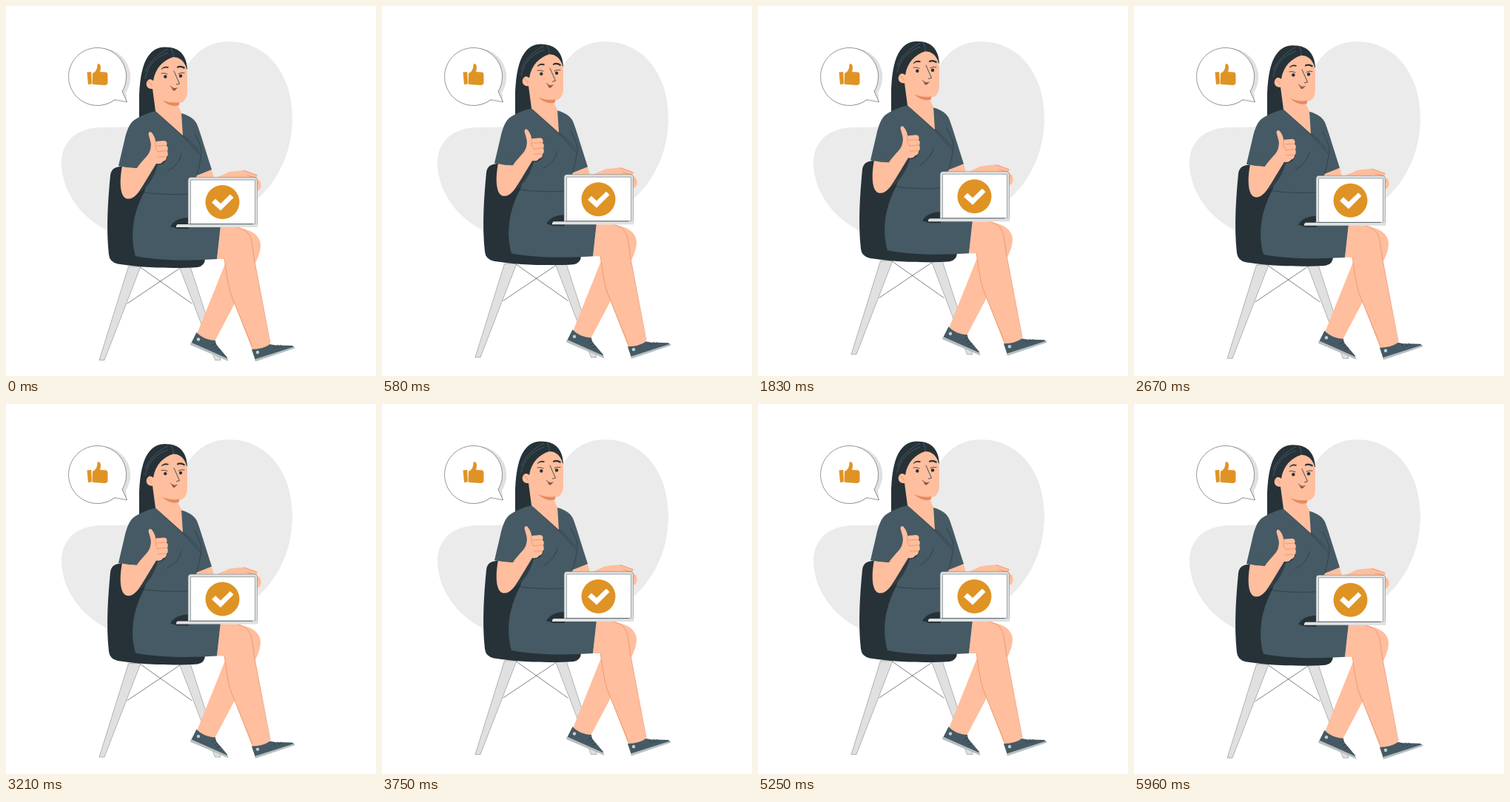
Animation, 500 px wide and 500 px high, one loop 6000 ms. Source, as an HTML page:

```html
<!DOCTYPE html>
<html lang="en">
<head>
<meta charset="utf-8">
<title>Thumbs up</title>
<style>
  html, body { margin: 0; width: 100%; height: 100%; overflow: hidden; background: #fff; }
  svg { display: block; width: 100%; height: 100%; }
  .skin { fill: #ffbe9d; }
  .dark { fill: #263238; }
  .cloth { fill: #455a64; }
  .gold { fill: #df9324; }
  .metal { fill: #e0e0e0; stroke: #4b585f; stroke-width: .4; }
  .line { fill: none; stroke: #263238; stroke-width: .6; stroke-linecap: round; stroke-linejoin: round; }
  .face { stroke-width: .8; }
  .crease { fill: none; stroke: #e58b61; stroke-width: .7; stroke-linecap: round; }
</style>
</head>
<body>
<svg viewBox="0 0 500 500">
  <path fill="#ebebeb" d="M301 48C352 48 387 91 387 151C387 199 366 239 337 263C290 301 220 330 170 314C112 304 75 256 75 212C75 181 98 164 130 164C160 164 182 164 200 155C230 139 232 48 301 48Z"/>

  <!-- speech bubble -->
  <path fill="#e0e0e0" d="M129 57A39 39 0 0 1 162 117L164 130 149 126A39 39 0 1 1 129 57Z"/>
  <path fill="#fff" stroke="#263238" stroke-width=".5" d="M147 126.600A39 39 0 1 1 157 115.500L163.500 129.700Z"/>
  <g class="gold">
    <path d="M109.500 89.500L115.300 89 115.800 105.500 111 106Z"/>
    <path d="M117 91C121 89 123.500 86 123.500 79Q124 77.500 126 78.500C129 80.500 128 85 127 89L135.500 89.500Q137.500 90 137.500 94V104Q137 107 133 107L119 106Q116.500 106 116.500 104Z"/>
  </g>

  <g id="figure">
    <!-- chair -->
    <path class="line" d="M180 352L251 402M237 353L164 402"/>
    <path class="metal" d="M165.500 352H182L133 478.500H126ZM234 352H249L290 478.500H282.500Z"/>
    <path class="dark" d="M165 214L154 217Q142 218 141 229C138 260 135 300 139 336Q140 346 151 348.500C185 354 230 355 259 353Q269 351 269 341L200 250 190 220Z"/>

    <!-- legs -->
    <path class="skin" d="M303 300C325 298 344 308 344 323C344 332 340 342 335 351L308 404 281 455Q267 453 258 443L297 346Z"/>
    <path class="skin" d="M285 342L290 299H312C327 300 333 312 333 325L336 345 357 458Q346 465 333 465L304 390C299 375 298 358 295 342Z"/>
    <path class="crease" d="M313 299.500C328 302 332 313 333 325L336 345 357 455M295 342C298 358 299 375 304 390L333 461"/>

    <!-- shoes -->
    <path class="cloth" d="M257.500 441C264 448 274 452 283 452Q283 457 288 462L299 475V479L249.500 457Z"/>
    <path fill="#b7bec2" d="M250 454.500L299.500 476.500 300.500 480 249 458Z"/>
    <path class="cloth" d="M332 464Q347 464 357 457Q362 459 371 458.500L387 459 390 461.500 337 479Z"/>
    <path fill="#b7bec2" d="M336 477.500L389 460.500 390.500 462.500 337 480.500Z"/>
    <path class="line" d="M278 459L283 456M282 462L286 460M285 466L289 464M364 463L361 458M369 462L367 458M373 461L371 458"/>
    <g fill="#c7ced1"><circle cx="260" cy="450.500" r="2.200"/><circle cx="340" cy="468" r="2.200"/></g>

    <!-- hair behind the neck -->
    <path class="dark" d="M180 153V120C181 95 185 78 192 68C200 57 208 54 222 56C235 58 244 67 245 85L215 110 203 144Z"/>

    <!-- far arm -->
    <path class="skin" d="M257 230L277 219 281 231 258 235ZM284 232L302 224Q312 223 322 222L339 228Q341 230 338 232L343 236Q346 243 344 246L341 250 337 246V235Z"/>
    <path class="crease" d="M322 222.500L339 228.500M326 229L338 232M337 235L341 240"/>

    <!-- dress -->
    <path class="cloth" d="M202 142C190 145 178 150 171 156C165 162 162 173 160 182L152 216 186 220 198 212 187 251C174 275 166 306 175 338C210 345 255 344 285 342L290 297 247 253 258 229 278 221C270 196 264 176 259 162Q255 150 237 145Z"/>
    <path fill="#2f3d45" d="M199 213L218 203Q217 214 205 215C200 232 193 241 186 248L178 253Z"/>
    <path class="dark" d="M247 286Q229 286 222 298L232 301H247Z"/>
    <path class="line" d="M202 142L239 176 262 201M238 174Q247 180 261 196M255 173C263 188 264 192 264 199Q262 215 258 228M237 200Q234 215 218 223M187 252Q215 256 247 254"/>

    <!-- head -->
    <path class="skin" d="M226 69C238 69 245 80 245 92V115Q245 131 231 132L237 144 239 175 202 142 198 112C189 113 187 102 194 99Q197 99 199 101C202 83 213 73 226 69Z"/>
    <path fill="#e58b61" d="M211 127Q222 132 234 130V134Q223 138 211 127Z"/>
    <path fill="none" stroke="#607d8b" stroke-width=".5" d="M188 98C192 79 203 69 219 63M188 89C195 73 207 64 219 58M223 57Q227 64 226 69"/>
    <path class="dark" d="M210 85Q214 80 220 82.500L219 84Q214 82.500 210 86ZM231 82Q236 79 242 83L241 85Q236 81.500 231 84Z"/>
    <g class="dark"><circle cx="215.300" cy="95.500" r="2.200"/><circle cx="236" cy="94.500" r="2.200"/></g>
    <path class="line face" d="M210 91Q214 90 218 92M233 91.500Q237 89.500 241 90.500M227 88L234.500 105 230.500 106M222.500 108.500Q226 113 231 111"/>
    <path fill="#a2503c" d="M223.500 110Q227 113 230.500 111.500Q228.500 115.500 225.500 114Z"/>
    <path class="crease" d="M192 103Q196 103 197 108"/>

    <!-- raised hand -->
    <path class="skin" d="M157 216C153 237 154 256 162 260C172 263 178 254 186 241L203 213Q210 214 212 210Q217 209 217 204Q220 201 218 196Q220 191 217 189Q219 183 214 182L202 183C202 179 199 173 196 170.500Q193 169 192.500 173C194 180 197 186 195.500 191Q195 197 191 202L176 219Z"/>
    <path class="crease" d="M202 183L202 191M204 189L216 188.500M205 197L217 195.500M205 204L216 203.500M202 191Q203 195 206 197"/>
    <path class="cloth" d="M152 216L160 208H184L177 219Q164 219 152 216Z"/>

    <!-- laptop -->
    <path class="metal" d="M246 298V236Q246 231.500 250 231.500H335Q339.500 231.500 339.500 236V298Z"/>
    <path fill="#fff" stroke="#455a64" stroke-width=".5" d="M249.500 235H336.500V294.500H249.500Z"/>
    <path fill="#e0e0e0" d="M232 295H340V299H230Q229.500 296 232 295Z"/>
    <path class="line" d="M247 294.700H333"/>
    <circle class="gold" cx="292.500" cy="265" r="23"/>
    <path fill="#fff" d="M278 265.500L283 260.500 290 267 303 254.500 307.500 259 290 276.500Z"/>
  </g>
</svg>
<script>
  const figure = document.getElementById('figure');
  const PERIOD = 3000, LIFT = 10;

  // Linear rise and fall, two floats per loop
  function draw(now) {
    const phase = now % PERIOD / PERIOD;
    const y = -LIFT * (1 - Math.abs(1 - 2 * phase));
    figure.setAttribute('transform', `translate(0 ${y})`);
    requestAnimationFrame(draw);
  }
  requestAnimationFrame(draw);
</script>
</body>
</html>
```
